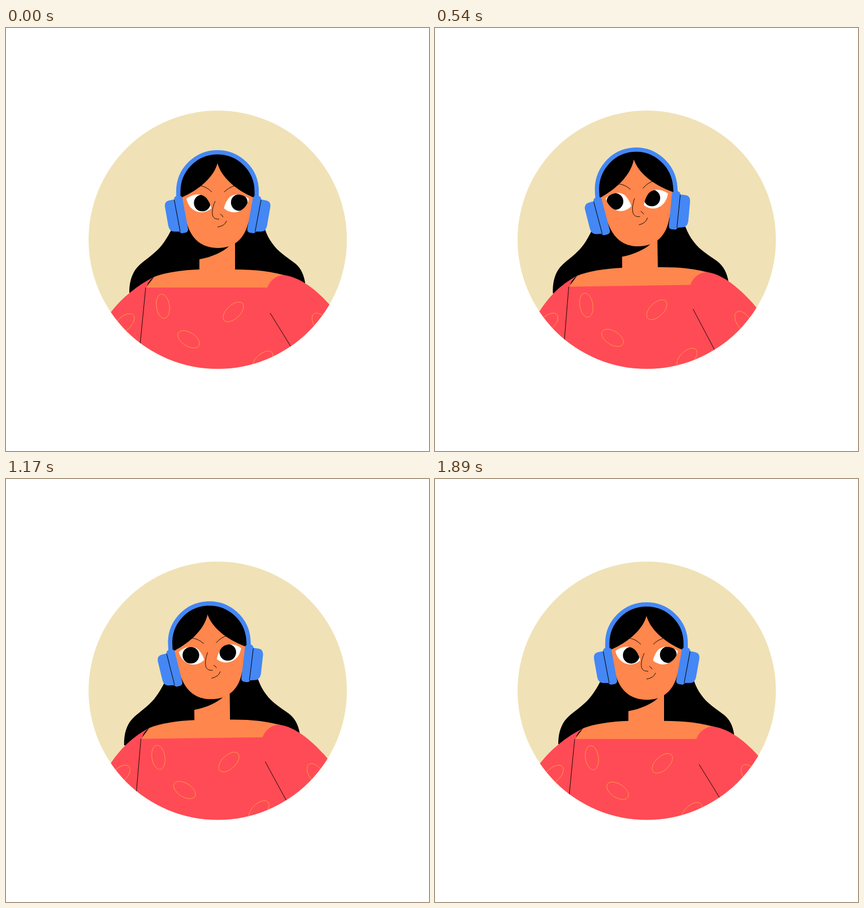
An HTML page with a canvas that plays this animation: 748x748 px, repeating every 1920 ms.

```html
<!DOCTYPE html>
<html lang="en">
<head>
<meta charset="utf-8">
<title>Listening to music</title>
<style>
html, body { margin: 0; width: 100%; height: 100%; overflow: hidden; background: #fff; }
canvas { display: block; width: 100vw; height: 100vh; }
</style>
</head>
<body>
<canvas id="stage" width="748" height="748"></canvas>
<script>
const ctx = document.getElementById('stage').getContext('2d');
const LOOP = 1920, STEP = 30, BEAT = 480;
const SKIN = '#ff864c', RED = '#ff4b55', BLUE = '#4487f5', CREAM = '#f0e2b6',
      BLACK = '#000', GOLD = '#ffa24d';

const lerp = (a, b, k) => a + (b - a) * k;
const clamp = v => Math.min(1, Math.max(0, v));
const smooth = v => { v = clamp(v); return v * v * (3 - 2 * v); };
const ramp = (t, from, to) => smooth((t - from) / (to - from));

// timing curves
const sway = t => ramp(t, 0, 400) - ramp(t, 1045, 1485);
const gaze = t => -12 * ramp(t, 200, 460) + 5 * ramp(t, 1000, 1160) + 7 * ramp(t, 1385, 1590);
const blink = t => Math.max(smooth(1 - Math.abs(t - 300) / 130), smooth(1 - Math.abs(t - 1410) / 130));
function bounce(t) {
  const a = 2 * Math.PI * (t - 105) / BEAT;
  return -0.3 - 5.5 * Math.cos(a) - 1.49 * Math.cos(2 * a);
}

function rotate(x, y, cx, cy, a) {
  const c = Math.cos(a), s = Math.sin(a), dx = x - cx, dy = y - cy;
  return [cx + dx * c - dy * s, cy + dx * s + dy * c];
}

// builds a path whose every "x,y" pair goes through a mapping
function shape(map, d) {
  return new Path2D(d.replace(/(-?[\d.]+),(-?[\d.]+)/g,
    (m, x, y) => map(+x, +y).map(v => v.toFixed(2)).join(',')));
}
const mirror = map => (x, y) => map(748.5 - x, y);

function fill(path, color) {
  ctx.fillStyle = color;
  ctx.fill(path);
}
function stroke(path, color = BLACK, width = 0.9) {
  ctx.strokeStyle = color;
  ctx.lineWidth = width;
  ctx.stroke(path);
}

const PATTERN = [ // x, y, rx, ry, degrees
  [277.5, 492, 11.5, 21.5, -8], [402, 502, 22, 12, -43], [323, 550.5, 21.5, 12, 33],
  [454, 588.5, 22, 12, -43], [209, 522.5, 22, 12, -43], [557, 523, 21.5, 12, 55]
];

function pose(t) {
  const s = sway(t), b = bounce(t), drag = sway(t - 75);
  const tilt = -4.5 * Math.PI / 180 * s, lean = -0.9 * Math.PI / 180 * s;
  const head = (x, y) => rotate(x, y + b * (1 - 0.0044 * (y - 216)), 374, 518, tilt);
  const face = (x, y) => rotate(x, y + b * (1.35 - 0.0047 * (y - 239)), 374, 518, tilt);
  const lift = k => (x, y) => {
    const [u, v] = rotate(x, y, 330, 458, lean);
    return [u - 10.5 * s, v - 0.7 * s + b * k];
  };
  const body = lift(0.37);
  const blouse = (x, y) => {
    const [u, v] = body(x, y);
    if (x < 190) return [u + 10 * s, v - 2 * s];
    if (x < 210) return [u + 6 * s, v];
    return x > 540 ? [u, v + 4 * s] : [u, v];
  };
  const hair = (x, y) => {
    const k = clamp((y - 358) / 107);
    return [x + lerp(-14.5 * s, -9.5 * drag, k),
            y + b * lerp(0.5, 0.4, k) + s * (1 - 0.015 * (x - 374))];
  };
  return { s, b, lean, head, face, body, blouse, hair, throat: lift(0.65) };
}

function drawHair(p) {
  fill(shape(p.hair,
    'M293,356 C285,371 276,386 264,396 C251,408 238,415 229,427 C221,439 218,452 218,468 ' +
    'L260,476 L490,470 L529,451 C527,437 522,425 511,416 C498,406 480,395 471,381 ' +
    'C465,373 461,365 458,356 L430,310 L320,310 Z'), BLACK);
}

function drawNeck(p) {
  const at = p.throat, low = p.body;
  const pt = (m, x, y) => m(x, y).map(v => v.toFixed(2)).join(',');
  fill(new Path2D(`M${pt(at, 342, 409)} C${pt(at, 364, 405)} ${pt(at, 384, 396)} ${pt(at, 394, 386)} ` +
    `L${pt(at, 405, 376)} L${pt(low, 405, 430)} L${pt(low, 342, 430)} Z`), SKIN);
}

function drawBody(p) {
  fill(shape(p.body,
    'M342,427 C312,428 282,432 262,440 L245,462 L465,462 L502,440 C470,430 440,427 405,427 Z'), SKIN);
  fill(shape(p.blouse,
    'M249,459 L462,459 C468,444 480,437 492,437 C520,441 548,462 571,488 L620,548 L620,640 ' +
    'L120,640 L140,558 L185,503 C205,477 232,455 262,440 C255,445 250,451 249,459 Z'), RED);
  for (const [x, y, rx, ry, deg] of PATTERN) {
    const [u, v] = p.body(x, y), far = x > 540 ? p.s : 0;
    const e = new Path2D();
    e.ellipse(u - 1.5 * far, v + 3 * far, rx, ry, deg * Math.PI / 180 + p.lean, 0, 2 * Math.PI);
    stroke(e, GOLD);
  }
  stroke(shape(p.body, 'M247,459 L236,571'));
  const dy = p.b * 0.37, arm = new Path2D();
  arm.moveTo(467 - 10.7 * p.s, 504 - 5 * p.s + dy);
  arm.lineTo(514 - 15 * p.s, 580 + dy);
  stroke(arm);
}

function drawEye(map, q, px, py) {
  const mix = (x, open, shut) => `${x},${lerp(open, shut, q).toFixed(2)}`;
  const eye = shape(map,
    `M319,302 C${mix(330, 293, 301)} ${mix(345, 291, 301)} ${mix(354, 300, 308)} ` +
    `C${mix(359, 306, 313)} 362,313 363,319 C352,328 342,327 334,323 C326,319 321,311 319,302 Z`);
  fill(eye, '#fff');
  ctx.save();
  ctx.clip(eye);
  const ball = new Path2D();
  ball.arc(px, py, 14.7, 0, 2 * Math.PI);
  fill(ball, BLACK);
  ctx.restore();
}

function drawFace(p, t) {
  fill(shape(p.face,
    'M374,239 C368,262 344,285 310,300 C312,318 315,333 320,346 C328,373 346,389 375,389 ' +
    'C403,389 421,373 428,346 C433,333 436,318 438,300 C404,285 380,262 374,239 Z'), SKIN);
  const q = blink(t), g = gaze(t);
  const [lx, ly] = p.face(347, 309.5), [rx, ry] = p.face(412.5, 308.5);
  drawEye(p.face, q, lx + g, ly);
  drawEye(mirror(p.face), q, rx + g, ry);
  for (const d of [
    'M342,278.5 Q355,280.5 364,290',
    'M386,290 Q394,281.5 406,278.5',
    'M370,306 C366,314 363,327 366,333 C368,337 372,338 377,338',
    'M379,329 Q382,330.5 384,334.5',
    'M374,352 Q387,350 390,341'
  ]) stroke(shape(p.face, d));
}

function drawPhones(p) {
  stroke(shape(p.head,
    'M304.7,302 L304.7,289 C304.7,250.7 335.7,219.7 374,219.7 ' +
    'C412.3,219.7 443.3,250.7 443.3,289 L443.3,302'), BLUE, 7.6);
  for (const map of [p.head, mirror(p.head)]) {
    fill(shape(map,
      'M298,303 L288,305 Q280,307 281,316 L287,350 Q289,360 298,360 L309,360 Z'), BLUE);
    fill(shape(map,
      'M302,297 L308,297 Q311,297 312,301 L322,356 Q322,361 317,362 L311,363 ' +
      'Q307,362 306,358 L297,304 Q297,298 302,297 Z'), BLUE);
    stroke(shape(map, 'M297.5,304 L308,360'), BLACK, 1);
  }
}

function draw(t) {
  const p = pose(t);
  ctx.fillStyle = '#fff';
  ctx.fillRect(0, 0, 748, 748);
  ctx.save();
  const disc = new Path2D();
  disc.arc(374.4, 374.4, 228.4, 0, 2 * Math.PI);
  fill(disc, CREAM);
  ctx.clip(disc);
  drawHair(p);
  drawNeck(p);
  drawBody(p);
  fill(shape(p.head,
    'M306,310 L306,289 C306,251 336,221 374,221 C412,221 442,251 442,289 L442,310 Z'), BLACK);
  drawFace(p, t);
  drawPhones(p);
  ctx.restore();
}

function tick() {
  const t = performance.now() % LOOP;
  draw(Math.floor(t / STEP) * STEP);
  requestAnimationFrame(tick);
}
tick();
</script>
</body>
</html>
```
